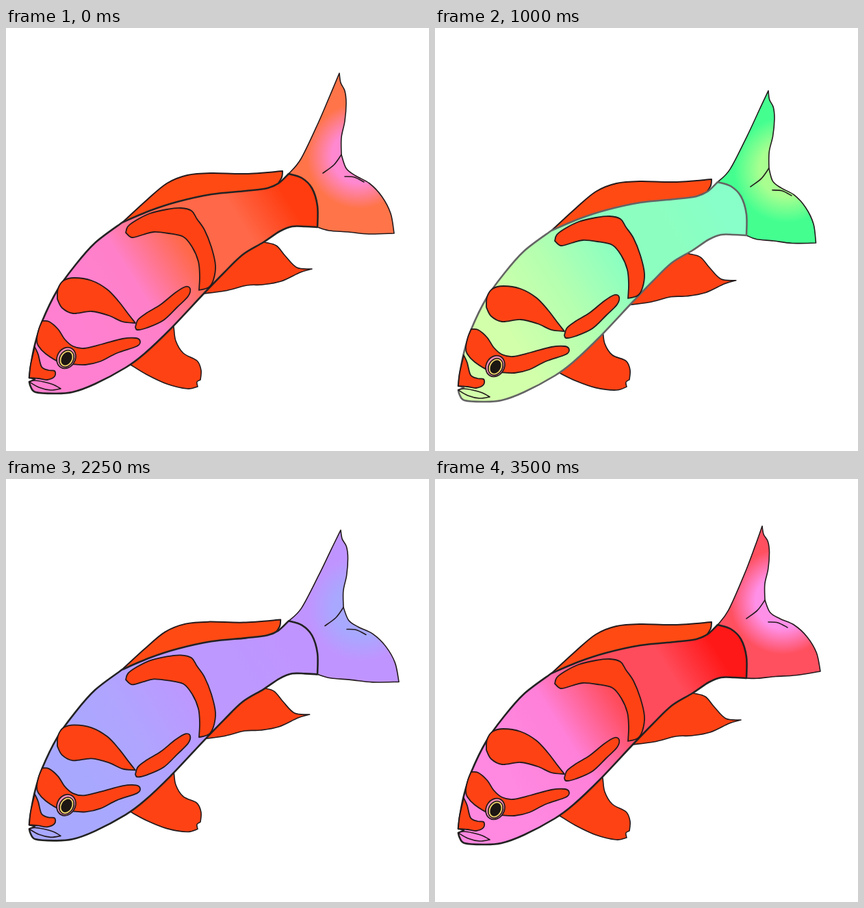
Animation, 618 px wide and 618 px high, one loop 3.75 s. Source, as an HTML page with a canvas:

```html
<!DOCTYPE html>
<html lang="en">
<head>
<meta charset="utf-8">
<title>Colour-shifting fish</title>
<style>
html, body { margin: 0; width: 100%; height: 100%; overflow: hidden; background: #fff; }
canvas { display: block; width: 618px; height: 618px; }
</style>
</head>
<body>
<canvas id="stage" width="618" height="618"></canvas>
<script>
const ctx = document.getElementById('stage').getContext('2d');
const STEP = 250, COUNT = 15;
const RED = '#ff4214', INK = '#231a1c';

const mix = (a, b, t) => a + (b - a) * t;

// Finds the pair of keys around a step and how far it lies between them
function between(keys, step) {
  const i = Math.max(1, keys.findIndex(k => k[0] >= step));
  const [a, b] = [keys[i - 1], keys[i]];
  return [a[1], b[1], (step - a[0]) / (b[0] - a[0])];
}
const along = (keys, step) => mix(...between(keys, step));

// Motion as [step, value] turning points
const bobKeys = [[0, 0], [2, 4], [4, 12], [5, -6], [7, -7], [10, -5], [11, 1], [12, 3], [14, 0]];
const tipKeys = [[0, 0], [2, 6], [4, 0], [7, -2], [9, 2], [14, -9]];
const lobeKeys = [[0, 0], [1, 8], [3, 6], [5, -27], [6, -28], [9, 7], [10, 11], [14, -4]];
const finKeys = [[0, 0], [2, .12], [7, .12], [9, .07], [11, .235], [14, 0]];

function poseAt(step) {
  const bob = along(bobKeys, step);
  const dip = 16 * Math.sin(Math.PI * (step / COUNT) ** .85);
  const lift = 2 * Math.min(1, step) - 4.2 * Math.max(0, step - 9);
  return {
    bob,
    tip: [along(tipKeys, step), bob + dip],
    lobe: [along(lobeKeys, step), bob + lift],
    fin: along(finKeys, step)
  };
}

// Body from head to tail (4), then tail centre and rim
const looks = [
  [0, 'ff80d0 ff80c8 ff6848 ff3c10 ff88d0 ff7448'],
  [2, 'fcbf74 fff768 a8ff50 78ff48 ffcc80 b8ff48'],
  [4, 'd2ffaa b4ffb0 8cffc0 88ffc8 a8ff90 44ff90'],
  [7, '5cffff 8cbcff a0a8ff a0a8ff 80d0ff a4acff'],
  [9, 'a8a8ff b0a4ff bc98ff c094ff a8a8ff c094ff'],
  [11, 'dc9cff f890f4 ff66d2 ff40b8 dca0ff ff60d0'],
  [14, 'ff88e0 ff80d8 ff4c5c ff1818 ff90e8 ff5060']
].map(([at, hexes]) => [at, hexes.split(' ').map(toHsl)]);

function toHsl(hex) {
  const [r, g, b] = [0, 2, 4].map(i => parseInt(hex.substr(i, 2), 16) / 255);
  const hi = Math.max(r, g, b), lo = Math.min(r, g, b), d = hi - lo, l = (hi + lo) / 2;
  const h = hi === r ? (g - b) / d : hi === g ? 2 + (b - r) / d : 4 + (r - g) / d;
  return [(h * 60 + 360) % 360, d / (1 - Math.abs(2 * l - 1)) * 100, l * 100];
}

// Hues always travel forward around the wheel
function coloursAt(step) {
  const [from, to, t] = between(looks, step);
  return from.map(([h, s, l], n) => {
    const [h2, s2, l2] = to[n];
    return `hsl(${h + (h2 - h + 360) % 360 * t}, ${mix(s, s2, t)}%, ${mix(l, l2, t)}%)`;
  });
}

// The body outline fades while the fish is green
function outlineAt(step) {
  const g = Math.round(34 + 66 * Math.exp(-(((step - 4) / 2) ** 2)));
  return `rgb(${g},${g},${g})`;
}

// "x,y x,y | x,y": smooth runs joined by corners
function parse(text) {
  const runs = text.split('|').map(run => run.trim().split(/\s+/).map(p => p.split(',').map(Number)));
  for (let i = 1; i < runs.length; i++) runs[i].unshift(runs[i - 1][runs[i - 1].length - 1]);
  return runs;
}

function trace(runs) {
  const path = new Path2D();
  path.moveTo(...runs[0][0]);
  for (const p of runs) {
    for (let i = 0; i < p.length - 1; i++) {
      const a = p[i - 1] || p[i], b = p[i], c = p[i + 1], d = p[i + 2] || c;
      path.bezierCurveTo(b[0] + (c[0] - a[0]) / 6, b[1] + (c[1] - a[1]) / 6,
        c[0] - (d[0] - b[0]) / 6, c[1] - (d[1] - b[1]) / 6, c[0], c[1]);
    }
  }
  return path;
}

const shape = text => trace(parse(text));

const body = shape(`34,511 36,494 42,463 53,428 75,383 100,348 130,314 170,284 | 210,267 250,254
  300,243 350,238 382,234 398,227 413,213 | 432,219 447,234 455,260 455,291 | 437,290 418,290
  400,297 376,313 346,331 318,358 288,389 240,440 202,476 175,496 130,520 97,532 70,534 43,532
  36,524 34,517 | 42,513 34,511`);
const dorsal = shape(`168,286 205,252 235,227 265,215 300,212 350,213 404,209 | 403,218 397,228 |
  350,245 250,262 168,286`);
const analFin = shape(`365,310 378,313 395,318 408,333 425,350 447,352 | 430,357 402,370 375,375
  352,376 320,384 288,388 | 320,340 365,310`);
const pelvicFin = shape(`240,410 245,437 248,457 259,475 279,486 285,500 284,514 | 279,517 280,524 |
  265,527 235,520 205,506 182,492 | 200,460 240,410`);
const marks = [
  `175,299 178,290 190,281 210,271 235,265 255,263 271,267 279,279 290,295 300,320 306,347
   303,368 296,379 282,383 | 283,362 281,341 272,320 259,305 237,300 216,298 200,302 184,306 175,299`,
  `75,396 76,381 84,369 100,365 125,369 148,382 165,400 178,417 189,431 | 170,429 150,420 125,414
   98,417 82,409 75,396`,
  `189,437 193,426 206,416 226,404 247,387 262,378 269,381 266,392 250,408 230,427 206,438
   192,441 189,437`,
  `53,428 63,429 76,440 86,455 98,465 114,468 140,462 170,454 190,453 196,458 191,465 162,475
   138,487 116,492 96,491 | 80,489 58,476 47,464 45,455 48,440 53,428`,
  `42,466 47,477 52,495 62,500 71,501 71,509 60,514 47,512 34,511 | 36,492 42,466`
].map(shape);
const mouth = shape('34,517 42,515 55,517 69,521 80,527 | 65,529 48,525 34,517');

const tail = parse(`413,213 431,191 456,139 474,97 487,66 | 489,80 495,92 497,110 495,136
  490,160 490,185 | 497,205 511,216 531,227 549,246 562,271 567,300 | 530,301 500,298 472,296
  455,291 | 440,250 413,213`);
const creases = ['490,185 479,200 463,212', '495,217 509,218 523,225'].map(shape);

function paint(path, fill, line, width) {
  if (fill) { ctx.fillStyle = fill; ctx.fill(path); }
  ctx.strokeStyle = line;
  ctx.lineWidth = width;
  ctx.stroke(path);
}

function placed(x, y, draw) {
  ctx.save();
  ctx.translate(x, y);
  draw();
  ctx.restore();
}

function blend(gradient, stops) {
  for (const [at, col] of stops) gradient.addColorStop(at, col);
  return gradient;
}

// Each run carries its points between the shifts of its two ends
function drawTail({ bob, tip, lobe }, core, rim) {
  const root = [0, bob];
  const notch = [mix(tip[0], lobe[0], .2), mix(tip[1], lobe[1], .5)];
  const ends = [root, tip, notch, lobe, root, root];
  const runs = tail.map((run, r) => run.map(([x, y], i) => {
    const t = i / (run.length - 1);
    return [x + mix(ends[r][0], ends[r + 1][0], t), y + mix(ends[r][1], ends[r + 1][1], t)];
  }));
  const x = 516 + notch[0], y = 187 + notch[1];
  const glow = blend(ctx.createRadialGradient(x, y, 0, x, y, 110), [[.36, core], [.7, rim]]);
  paint(trace(runs), glow, INK, 1.6);
  placed(...notch, () => creases.forEach(c => paint(c, null, INK, 1.6)));
}

// The pelvic fin swings by shearing about its root
function drawPelvic({ bob, fin }) {
  placed(182, 492 + bob, () => {
    ctx.transform(1, -fin, 0, 1, 0, 0);
    ctx.translate(-182, -492);
    paint(pelvicFin, RED, INK, 1.6);
  });
}

function drawEye() {
  const oval = (rx, ry, fill, line, width) => {
    const p = new Path2D();
    p.ellipse(0, 0, rx, ry, .5, 0, 7);
    paint(p, fill, line, width);
  };
  placed(88, 482, () => oval(13.2, 16, '#f58fb8', INK, 1.8));
  placed(88.5, 483, () => {
    oval(10.5, 13.2, INK, INK, 1);
    oval(8.3, 11.2, '#1c1713', '#f2d56c', 1.8);
  });
}

function draw(step) {
  const pose = poseAt(step), { bob } = pose;
  const [head, neck, flank, stem, core, rim] = coloursAt(step);
  ctx.fillStyle = '#fff';
  ctx.fillRect(0, 0, 618, 618);
  ctx.lineJoin = ctx.lineCap = 'round';
  drawPelvic(pose);
  placed(-.6 * Math.abs(bob), 1.4 * bob, () => paint(analFin, RED, INK, 1.6));
  drawTail(pose, core, rim);
  placed(Math.min(0, bob) / 2, Math.max(bob, .6 * bob), () => paint(dorsal, '#ff4a14', INK, 2));
  placed(0, bob, () => {
    const skin = blend(ctx.createLinearGradient(80, 470, 430, 250),
      [[.1, head], [.35, neck], [.57, flank], [.78, flank], [.96, stem]]);
    paint(body, skin, outlineAt(step), 2.6);
    marks.forEach(m => paint(m, RED, INK, 1.8));
    paint(mouth, head, INK, 1.6);
    drawEye();
  });
}

let shown = -1;
const start = performance.now();
function tick(now) {
  const step = Math.floor(Math.max(0, now - start) / STEP) % COUNT;
  if (step !== shown) draw(shown = step);
  requestAnimationFrame(tick);
}
tick(start);
</script>
</body>
</html>
```
